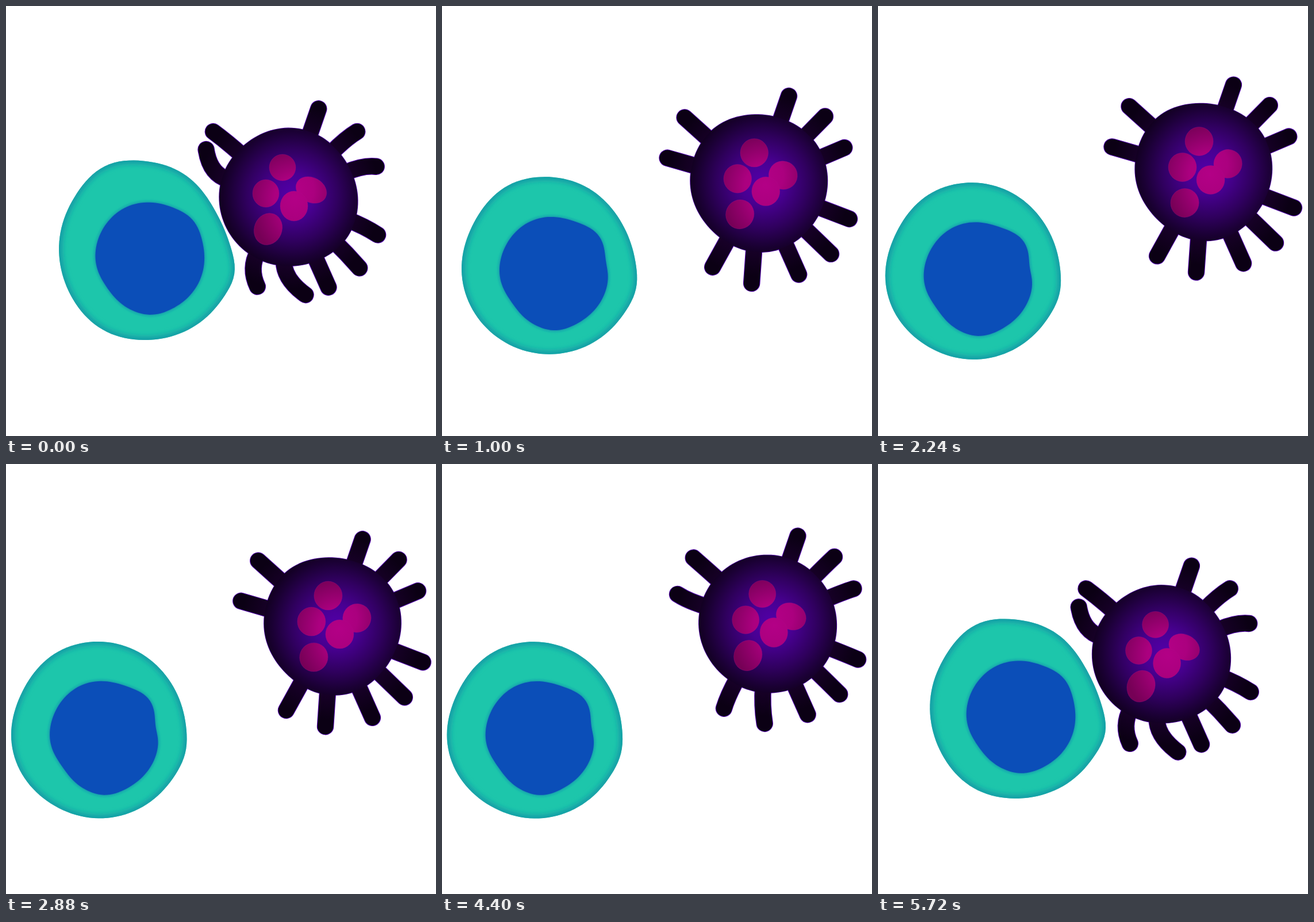
Animation, 748 px wide and 748 px high, one loop 5760 ms. Source, as an HTML page:

```html
<!DOCTYPE html>
<html lang="en">
<head>
<meta charset="utf-8">
<title>Cell and granulocyte</title>
<style>
  html, body { margin: 0; width: 100%; height: 100%; overflow: hidden; background: #fff; }
  svg { display: block; width: 100%; height: 100%; }
</style>
</head>
<body>
<svg viewBox="0 0 748 748">
  <defs>
    <clipPath id="membraneClip"><path class="membrane"/></clipPath>
    <filter id="soft" x="-20%" y="-20%" width="140%" height="140%"><feGaussianBlur stdDeviation="5"/></filter>
    <filter id="halo" x="-20%" y="-20%" width="140%" height="140%"><feGaussianBlur stdDeviation="2.5"/></filter>
    <radialGradient id="bodyFill" gradientUnits="userSpaceOnUse" cx="7" cy="-3" r="128">
      <stop offset="0" stop-color="#5200a8"/>
      <stop offset=".3" stop-color="#480092"/>
      <stop offset=".62" stop-color="#30005f"/>
      <stop offset=".86" stop-color="#1b0035"/>
      <stop offset="1" stop-color="#11001f"/>
    </radialGradient>
    <radialGradient id="armFill" gradientUnits="userSpaceOnUse" cx="0" cy="0" r="160">
      <stop offset=".7" stop-color="#180029"/>
      <stop offset="1" stop-color="#0b0014"/>
    </radialGradient>
    <radialGradient id="lobeFill" gradientUnits="userSpaceOnUse" cx="12" cy="2" r="90">
      <stop offset="0" stop-color="#b30086"/>
      <stop offset=".4" stop-color="#ab007f"/>
      <stop offset="1" stop-color="#760056"/>
    </radialGradient>
  </defs>
  <g>
    <path class="membrane" fill="#1dc6ab"/>
    <g clip-path="url(#membraneClip)">
      <path class="membrane" fill="none" stroke="#1598a6" stroke-width="11" filter="url(#soft)"/>
    </g>
    <path class="nucleus" fill="#148fae" stroke="#148fae" stroke-width="3" filter="url(#halo)"/>
    <path class="nucleus" fill="#0b4eb8"/>
  </g>
  <g id="spiky">
    <path class="body" fill="none" stroke="#4b00a4" stroke-width="1.6"/>
    <g id="armEdges" fill="none" stroke="#5200b0" stroke-width="29.5" stroke-linecap="round"/>
    <g id="armFills" fill="none" stroke="url(#armFill)" stroke-width="27.5" stroke-linecap="round"/>
    <path class="body" fill="url(#bodyFill)"/>
    <g id="lobes" fill="url(#lobeFill)" stroke="#b0108a" stroke-opacity=".3"/>
  </g>
</svg>
<script>
const LOOP = 5760, STEP = 40, TOUCH = 5740;

// Blobs are circles with soft bumps: direction, height when touching, height when apart, spread.
const MEMBRANE = { radius: 154, bumps: [
  [332, -18, -3, 26], [243, 11, 0, 16], [15, 6, 3, 10], [120, 4, -2, 18], [206, 2, -6, 20]
] };
const NUCLEUS = { radius: 95, bumps: [
  [145, -5, -7, 18], [88, 3, 4, 14], [318, 5, 8, 14], [250, 3, 5, 28], [347, 0, -4, 10]
] };
const BODY = { radius: 120, bumps: [
  [135, 0, -7, 28], [232, -2, 5, 20], [325, -3, 3, 20], [35, 4, -4, 22]
] };

// Arms point straight out when apart: direction, reach, swing of the tip when touching.
const ARMS = [
  [-71, 162, 0], [-45.5, 165, 2], [-23, 162, 4], [21, 169, 2], [44, 175, 1],
  [66, 172, 0], [94, 173, -14], [119, 165, -10], [222, 173, -1], [196, 165, 14]
];

// Lobes when touching: x, y, rx, ry, tilt. Apart, they round off and drift together.
const LOBES = [
  [-10, -51, 23, 23, 0], [-39, -6, 23, 24, 0], [40, -12, 28, 21.5, 28],
  [10, 16, 24, 26, 0], [-35, 56, 24, 28, 22]
];

const $ = id => document.getElementById(id);
const lerp = (a, b, k) => a + (b - a) * k;
const clamp = v => Math.min(1, Math.max(0, v));
const smooth = v => v * v * (3 - 2 * v);
const easeOut = v => 1 - (1 - v) ** 2;
const decay = (t, tau) => 1 - Math.exp(-t / tau);
const progress = (t, from, to) => clamp((t - from) / (to - from));
const comeBack = (t, from, power) => 1 - progress(t, from, TOUCH) ** power;

function polar(degrees, r) {
  const a = degrees * Math.PI / 180;
  return [r * Math.cos(a), r * Math.sin(a)];
}

function blobPath({ radius, bumps }, apart, cx = 0, cy = 0) {
  const points = [];
  for (let angle = 0; angle < 360; angle += 3) {
    let r = radius;
    for (const [direction, near, far, spread] of bumps) {
      const away = (angle - direction + 540) % 360 - 180;
      r += lerp(near, far, apart) * Math.exp(-((away / spread) ** 2) / 2);
    }
    const [x, y] = polar(angle, r);
    points.push(`${cx + x} ${cy + y}`);
  }
  return `M${points.join("L")}Z`;
}

// The arm leaves the body radially and bends towards its tip.
function armPath([direction, reach, swing], relax) {
  const base = polar(direction, 108);
  const elbow = polar(direction, 142);
  const tip = polar(direction + swing * (1 - relax), reach);
  return `M${base}Q${elbow} ${tip}`;
}

function setAttrs(el, attrs) {
  for (const key in attrs) el.setAttribute(key, attrs[key]);
}

function add(parent, tag) {
  return parent.appendChild(document.createElementNS("http://www.w3.org/2000/svg", tag));
}

function setPaths(name, d) {
  document.querySelectorAll("." + name).forEach(el => el.setAttribute("d", d));
}

const armPaths = ARMS.map(() => [add($("armEdges"), "path"), add($("armFills"), "path")]);
const lobeShapes = LOBES.map(() => add($("lobes"), "ellipse"));

function drawCell(t) {
  const apart = 1.01 * decay(t, 900) * comeBack(t, 4250, 1.55);
  setPaths("membrane", blobPath(MEMBRANE, apart, lerp(247, 158, apart), lerp(426, 464, apart)));
  setPaths("nucleus", blobPath(NUCLEUS, apart, lerp(250, 168, apart), lerp(439, 478, apart)));
}

function drawSpiky(t) {
  const x = 491 + 77.5 * decay(t, 680) * comeBack(t, 4250, 1.55);
  const y = 332 - 53.5 * easeOut(progress(t, 0, 4250)) * comeBack(t, 4500, 1.8);
  const armRelax = easeOut(progress(t, 0, 1000)) * comeBack(t, 1640, 4.5);
  const bodyRelax = easeOut(progress(t, 0, 1640)) * (1 - smooth(progress(t, 3500, 5000)));

  $("spiky").setAttribute("transform", `translate(${x} ${y})`);
  setPaths("body", blobPath(BODY, bodyRelax));
  ARMS.forEach((arm, i) => {
    const d = armPath(arm, armRelax);
    armPaths[i].forEach(el => el.setAttribute("d", d));
  });
  LOBES.forEach(([lx, ly, rx, ry, tilt], i) => {
    const cx = lx + 3 * bodyRelax, cy = ly - 4 * bodyRelax;
    setAttrs(lobeShapes[i], {
      cx, cy,
      rx: lerp(rx, 24.5, bodyRelax),
      ry: lerp(ry, 25, bodyRelax),
      transform: `rotate(${tilt} ${cx} ${cy})`
    });
  });
}

const start = performance.now();
function tick() {
  const elapsed = (performance.now() - start) % LOOP;
  const t = Math.floor(elapsed / STEP) * STEP;
  drawCell(t);
  drawSpiky(t);
  requestAnimationFrame(tick);
}
tick();
</script>
</body>
</html>
```
